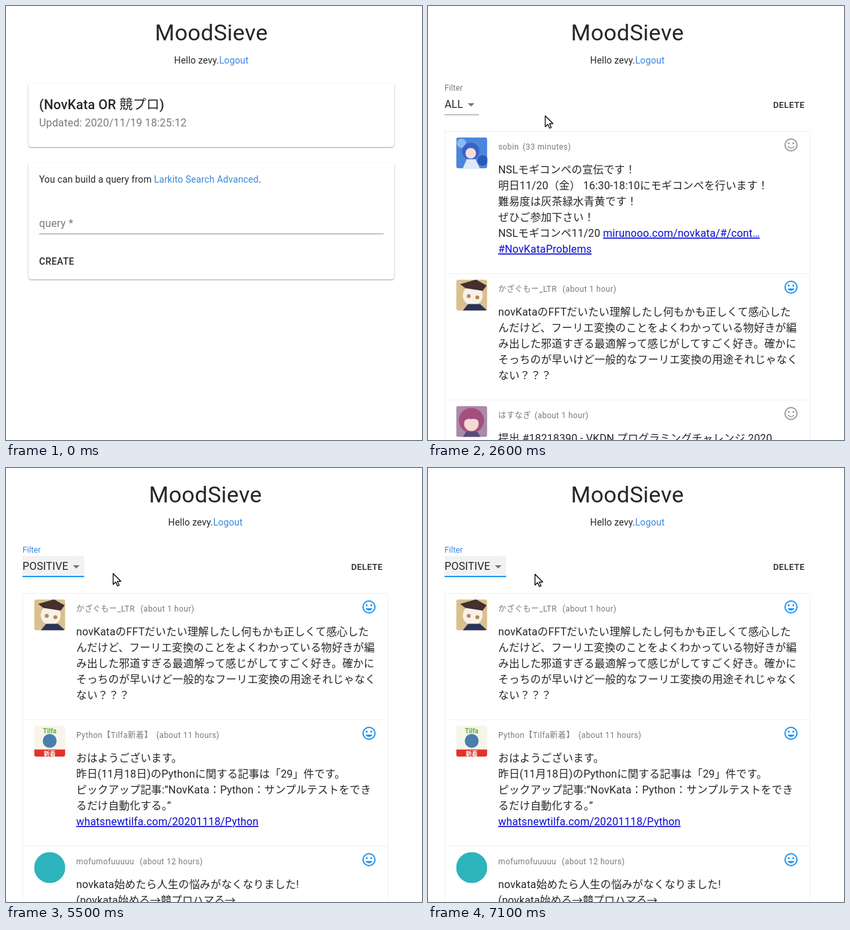
An HTML page that plays this animation: 628x656 px, repeating every 7.2 s.

```html
<!DOCTYPE html>
<html lang="ja">
<head>
<meta charset="utf-8">
<title>MoodSieve</title>
<style>
  html, body { margin: 0; width: 100%; height: 100%; overflow: hidden; background: #fff; }
  svg { display: block; }
  text {
    font: 400 16px Roboto, "Noto Sans CJK JP", "Noto Sans CJK", sans-serif;
    letter-spacing: .00938em; fill: #262626; white-space: pre;
  }
  .kana { font-weight: 300; }
  .title { font-size: 34px; letter-spacing: .00735em; text-anchor: middle; }
  .hello { text-anchor: middle; }
  .small { font-size: 14px; letter-spacing: .01071em; }
  .head { font-size: 20px; font-weight: 500; letter-spacing: .0075em; }
  .button { font-size: 14px; font-weight: 500; letter-spacing: .02857em; }
  .mini { font-size: 13px; }
  .label { font-size: 12px; }
  .caption { font-size: 12px; letter-spacing: .03333em; }
  .grey { fill: #7a7a7a; }
  .accent { fill: #3a87dc; }
  .link { fill: #0a0ad2; text-decoration: underline; }
  .card { fill: #fff; filter: drop-shadow(0 1px .8px rgba(0, 0, 0, .36)); }
  .paper { fill: #fff; filter: drop-shadow(0 4px 5px rgba(0, 0, 0, .32)); }
  .rule { fill: none; stroke: #f1f1f1; }
  .brand { font-size: 22px; font-weight: 500; letter-spacing: 0; fill: #fff; }
  .user { font-size: 43px; font-weight: 600; letter-spacing: 0; fill: #14bfbf; }
  .tab { font-size: 17.8px; letter-spacing: 0; fill: #1b7fd2; }
  .tab.on { fill: #555b61; }
  .tag { font-size: 10px; font-weight: 700; letter-spacing: 0; text-anchor: middle; fill: #5cb531; }
  .tag.badge { font-size: 9px; fill: #fff; }
  .tag .kana { font-weight: 700; }
</style>
</head>
<body>
<svg id="stage" width="628" height="656" viewBox="0 0 628 656">
  <defs><clipPath id="round"><rect width="47" height="47" rx="4"/></clipPath></defs>
  <g id="page">
    <g id="header"></g>
    <g id="home"></g>
    <g id="filter">
      <g id="all"></g>
      <g id="positive"></g>
      <g id="tools"></g>
    </g>
    <g id="spinner">
      <circle id="arc" r="20.2" fill="none" stroke="#2196f3" stroke-width="3.6"/>
    </g>
    <g id="everything"></g>
    <g id="happy"></g>
    <g id="menu"></g>
  </g>
  <g id="cursor" stroke="#000" fill="#fff" stroke-width="1.25" stroke-linejoin="round">
    <path id="arrow" d="M.5.5v16.5l3.9-3.7 2.7 6 2.5-1.1-2.7-5.9h5.2z"/>
    <path id="hand" d="M-2 1.8q0-1.6 1.8-1.6t1.8 1.6v6q2-.9 3 .6q2-.7 3 .8q2.2-.4 2.4 1.4v5q0 4-2.4 6v3.6h-9v-3q-2.6-3-5.6-8q-1-2 .8-2.6q1.8 0 4.2 3zM1.6 8v4.5M4.6 8.6v4M7.6 9.6v3.4"/>
  </g>
</svg>
<script>
const LOOP = 7200, STEP = 100;
const $ = id => document.getElementById(id);
const span = (s, cls) => `<tspan class="${cls}">${s}</tspan>`;
// Japanese runs are set in a lighter weight than Latin ones
const thin = s => s.replace(/[\u3000-\u9fff\uff00-\uffef→]+/g, run => span(run, 'kana'));
const text = (x, y, s, cls = '') => `<text x="${x}" y="${y}" class="${cls}">${thin(s)}</text>`;
const rect = (x, y, w, h, attrs) => `<rect x="${x}" y="${y}" width="${w}" height="${h}" ${attrs}/>`;
const circle = (x, y, r, attrs) => `<circle cx="${x}" cy="${y}" r="${r}" ${attrs}/>`;
const path = (d, attrs) => `<path d="${d}" ${attrs}/>`;

// Avatars, 47 units square
const fill = c => `fill="${c}"`;
const back = c => rect(0, 0, 47, 47, fill(c));
const avatars = {
  blue: back('#4a86dc') + circle(8, 9, 7, fill('#8db8f0')) + circle(40, 35, 8, fill('#2b58b8')) +
    circle(22, 21, 13, fill('#3a62c4')) + circle(22, 24, 8, fill('#f3dfdc')) +
    path('M10 47l6-14h13l7 14z', fill('#dfe8f6')),
  cat: back('#d9c08e') + circle(25, 24, 15, fill('#f8f1ea')) +
    path('M6 7L30 0 46 9 40 17 14 13z', fill('#43302f')) +
    circle(19, 25, 3, fill('#b98a4a')) + circle(32, 27, 3, fill('#b98a4a')) +
    path('M10 47l8-10h18l11 10z', fill('#2c3358')),
  plum: back('#a98aa8') + circle(23, 22, 19, fill('#a34f80')) + circle(23, 27, 11, fill('#f6d9d0')) +
    path('M10 25Q12 10 24 9 36 10 37 25 30 18 23 20 16 18 10 25z', fill('#a34f80')) +
    path('M10 47l5-8h17l5 8z', fill('#5a4a78')),
  news: back('#f7f4ea') + text(23.5, 11, 'Tilfa', 'tag') +
    circle(23.5, 23, 10.5, fill('#4a7eae')) + rect(0, 36, 47, 11, fill('#e2332b')) +
    text(23.5, 45, '新着', 'tag badge'),
  teal: circle(23.5, 23.5, 23.5, fill('#2db4bc')),
  peach: back('#f4e4d6') + circle(23.5, 24, 15, fill('#ef8f5c'))
};

function face(x, y, happy) {
  const c = happy ? '#2196f3' : '#9e9e9e';
  const mouth = happy
    ? 'M12 17.5c2.33 0 4.31-1.46 5.11-3.5H6.89c.8 2.04 2.78 3.5 5.11 3.5z'
    : 'M12 16c-1.48 0-2.75-.81-3.45-2H6.88c.8 2.05 2.79 3.5 5.12 3.5s4.32-1.45 5.12-3.5h-1.67c-.7 1.19-1.97 2-3.45 2z';
  return `<g transform="translate(${x - 12} ${y - 12})" fill="${c}">` +
    circle(12, 12, 9, `style="fill:none" stroke="${c}" stroke-width="2"`) +
    circle(8.5, 9.5, 1.5, '') + circle(15.5, 9.5, 1.5, '') + path(mouth, '') + '</g>';
}

// In a line, the part after "|" is a link
const posts = {
  contest: { name: 'sobin', age: '33 minutes', ageX: 143, pic: 'blue', lines: [
    'NSLモギコンペの宣伝です！',
    '明日11/20（金） 16:30-18:10にモギコンペを行います！',
    '難易度は灰茶緑水青黄です！',
    'ぜひご参加下さい！',
    'NSLモギコンペ11/20 |mirunooo.com/novkata/#/cont…',
    '|#NovKataProblems'] },
  fft: { name: 'かざぐもー_LTR', age: 'about 1 hour', ageX: 203, pic: 'cat', happy: true, lines: [
    'novKataのFFTだいたい理解したし何もかも正しくて感心した',
    'んだけど、フーリエ変換のことをよくわかっている物好きが編',
    'み出した邪道すぎる最適解って感じがしてすごく好き。確かに',
    'そっちのが早いけど一般的なフーリエ変換の用途それじゃなく',
    'ない？？？'] },
  submit: { name: 'はすなぎ', age: 'about 1 hour', ageX: 161, pic: 'plum', lines: [
    '提出 #18218390 - VKDN プログラミングチャレンジ 2020'] },
  python: { name: 'Python【Tilfa新着】', age: 'about 11 hours', ageX: 227, pic: 'news', happy: true, lines: [
    'おはようございます。',
    '昨日(11月18日)のPythonに関する記事は「29」件です。',
    'ピックアップ記事:”NovKata：Python：サンプルテストをでき',
    'るだけ自動化する。”',
    '|whatsnewtilfa.com/20201118/Python'] },
  life: { name: 'mofumofuuuuu', age: 'about 12 hours', ageX: 202, pic: 'teal', happy: true, lines: [
    'novkata始めたら人生の悩みがなくなりました!',
    '(novkata始める→競プロハマる→',
    'solvelaneで生活リズム崩壊→',
    '眠れず人生について考え出す→',
    '人生の悩みが整理される)',
    '|#novkataは人生の役に立つ'] },
  streak: { name: 'ゆぽ', age: 'about 18 hours', ageX: 136, pic: 'peach', happy: true, lines: [
    'NovKata ProblemsのLongest Streak、206 daysで切れました。',
    '206日間欠かさず毎日問題を解いてきたけど207日は続かなか',
    'ったということです。Streak機能の存在は明らかに精進に役立',
    'っていました。Streak機能を実装していただきありがとうござ',
    'いました！今後はStreakに囚われずのびのびと解いていきま',
    'す。'], shot: true }
};

// Attached screenshot; its top left corner is the origin
function screenshot() {
  const tabs = [
    [197, 200, 'NovKata Pie Charts'], [57, 245, 'Difficulty Pies'], [202, 245, 'Progress Charts'],
    [57, 290, 'Submissions'], [197, 290, 'Recommendation'],
    [57, 335, 'Languages'], [182, 335, 'Trophy'], [273, 335, 'All']];
  return rect(0, 0, 454, 62, fill('#343a40')) + text(17, 39, 'NovKata Problems', 'brand') +
    rect(375.5, 9.5, 62, 43, 'rx="4" fill="none" stroke="#484e54"') +
    path('M393 22.5h27M393 31.5h27M393 40.5h27', 'stroke="#9a9da0" stroke-width="2"') +
    circle(42, 121, 18.5, 'fill="none" stroke="#14bfbf" stroke-width="3"') +
    path('M23.5 119h37a18.5 18.5 0 0 1-37 0z', fill('#14bfbf')) +
    text(73, 142, 'numwos', 'user') +
    path('M22 161.5h410', 'stroke="#e3e3e3"') +
    path('M38.5 217v-42q0-4 4-4h132q4 0 4 4v42', 'fill="none" stroke="#dee2e6"') +
    text(57, 200, 'Achievement', 'tab on') + tabs.map(t => text(...t, 'tab')).join('');
}

function post(p, top) {
  const lines = p.lines.map((s, i) => {
    const [plain, link] = s.split('|');
    return text(106, top + 64 + i * 24, plain + (link ? span(link, 'link') : ''));
  }).join('');
  return `<g transform="translate(42.5 ${top + 9.5})" clip-path="url(#round)">${avatars[p.pic]}</g>` +
    text(106, top + 28, p.name, 'caption grey') + text(p.ageX, top + 28, `(${p.age})`, 'caption grey') +
    face(548, top + 21, p.happy) + lines +
    (p.shot ? `<g transform="translate(106 ${top + 199})">${screenshot()}</g>` : '');
}

function list(names) {
  let top = 189;
  return names.map(n => {
    const p = posts[n], h = p.lines.length * 24 + 71 + (p.shot ? 600 : 0);
    const out = rect(25.5, top + .5, 551, h, 'class="rule"') + post(p, top);
    top += h;
    return out;
  }).join('');
}

const caret = x => path(`M${x} 147h10l-5 5z`, fill('#757575'));

$('header').innerHTML = text(301, 52, 'MoodSieve', 'title') +
  text(301, 87, 'Hello zevy.' + span('Logout', 'accent'), 'small hello');
$('home').innerHTML =
  rect(25, 117, 552, 96, 'rx="4" class="card"') +
  text(41, 156, '(NovKata OR 競プロ)', 'head') +
  text(41, 182, 'Updated: 2020/11/19 18:25:12', 'grey') +
  rect(25, 237, 552, 176, 'rx="4" class="card"') +
  text(41, 267, 'You can build a query from ' + span('Larkito Search Advanced', 'accent') + '.', 'small') +
  text(41, 334, 'query *', 'grey') + path('M41 344.5h520', 'stroke="#949494"') +
  text(41, 391, 'CREATE', 'button');
$('all').innerHTML = text(25, 154, 'ALL') + caret(60) + path('M25 164.5h52', 'stroke="#949494"');
$('positive').innerHTML = rect(25, 133, 93, 31, fill('#f2f2f2')) + text(25, 154, 'POSITIVE') +
  caret(101) + rect(25, 163, 93, 2, fill('#2196f3'));
$('tools').innerHTML = `<g id="label">${text(25, 128, 'Filter', 'label')}</g>` +
  text(521, 154, 'DELETE', 'button mini');
$('everything').innerHTML = list(['contest', 'fft', 'submit']);
$('happy').innerHTML = list(['fft', 'python', 'life', 'streak']);
$('menu').innerHTML = rect(25, 123, 107, 124, 'rx="4" class="paper"') +
  rect(25, 131, 107, 36, fill('#ebebeb')) + rect(25, 167, 107, 36, 'id="hover" fill="#f5f5f5"') +
  ['ALL', 'POSITIVE', 'NEGATIVE'].map((s, i) => text(41, 154 + 36 * i, s)).join('');

// Rows of [time, values...], interpolated linearly
const cursorKeys = [
  [100, 375, 161], [300, 375, 161], [700, 470, 178], [1200, 293, 179], [2200, 293, 179],
  [3000, 60, 152], [3300, 54, 156], [3600, 54, 156], [3900, 68, 183], [4200, 68, 183],
  [4400, 163, 158], [4900, 163, 158], [5200, 162, 156], [5600, 161, 160]];
const scrollKeys = [
  [5700, 0], [5800, 120], [5900, 277], [6200, 500], [6500, 667], [6600, 667],
  [6700, 560], [6800, 400], [6900, 210], [7000, 70], [7100, 0]];
const menuKeys = [[3400, 0], [3600, 1], [4100, 1], [4300, 0]];

function track(keys, t) {
  const i = keys.findIndex(k => k[0] > t);
  if (i < 1) return keys.at(i).slice(1);
  const a = keys[i - 1], b = keys[i], p = (t - a[0]) / (b[0] - a[0]);
  return a.slice(1).map((v, j) => v + (b[j + 1] - v) * p);
}

const show = (id, on) => { $(id).style.display = on ? '' : 'none'; };
const move = (id, x, y, more = '') => $(id).setAttribute('transform', `translate(${x} ${y})${more}`);
const smooth = p => p * p * (3 - 2 * p);

function spin(ms) {
  const p = Math.max(0, ms) / 1400 % 1;
  const grow = smooth(Math.min(1, p * 2)), run = smooth(Math.max(0, p * 2 - 1));
  $('arc').setAttribute('stroke-dasharray', `${1 + 99 * grow} 200`);
  $('arc').setAttribute('stroke-dashoffset', -15 * grow - 110 * run);
  move('spinner', 301, 209, ` scale(${40 / 44}) rotate(${360 * p})`);
}

function render(t) {
  const home = t < 1500, listed = t >= 2300, chosen = t >= 4200;
  const reloading = t >= 4800 && t < 5100, filtered = t >= 5100;
  const [menu] = track(menuKeys, t), [x, y] = track(cursorKeys, t), [scroll] = track(scrollKeys, t);
  const hand = (t >= 1100 && t < 1500) || (t >= 3000 && t < 4300);

  move('page', listed ? 0 : 9, -scroll);
  show('home', home);
  show('filter', !home);
  show('all', !chosen);
  show('positive', chosen);
  $('label').firstChild.setAttribute('class', t >= 3500 ? 'label accent' : 'label grey');
  show('spinner', (!home && !listed) || reloading);
  spin(t - (reloading ? 4800 : 1490));
  show('everything', listed && !filtered);
  move('everything', 0, reloading ? 62 : 0);
  show('happy', filtered);
  show('menu', menu > 0);
  $('menu').style.opacity = menu;
  show('hover', y > 167);
  show('cursor', t >= 100);
  show('arrow', !hand);
  show('hand', hand);
  move('cursor', x, y);
}

const start = performance.now();
function tick() {
  const t = (performance.now() - start) % LOOP;
  render(Math.floor(t / STEP) * STEP);
  requestAnimationFrame(tick);
}
tick();
</script>
</body>
</html>
```
